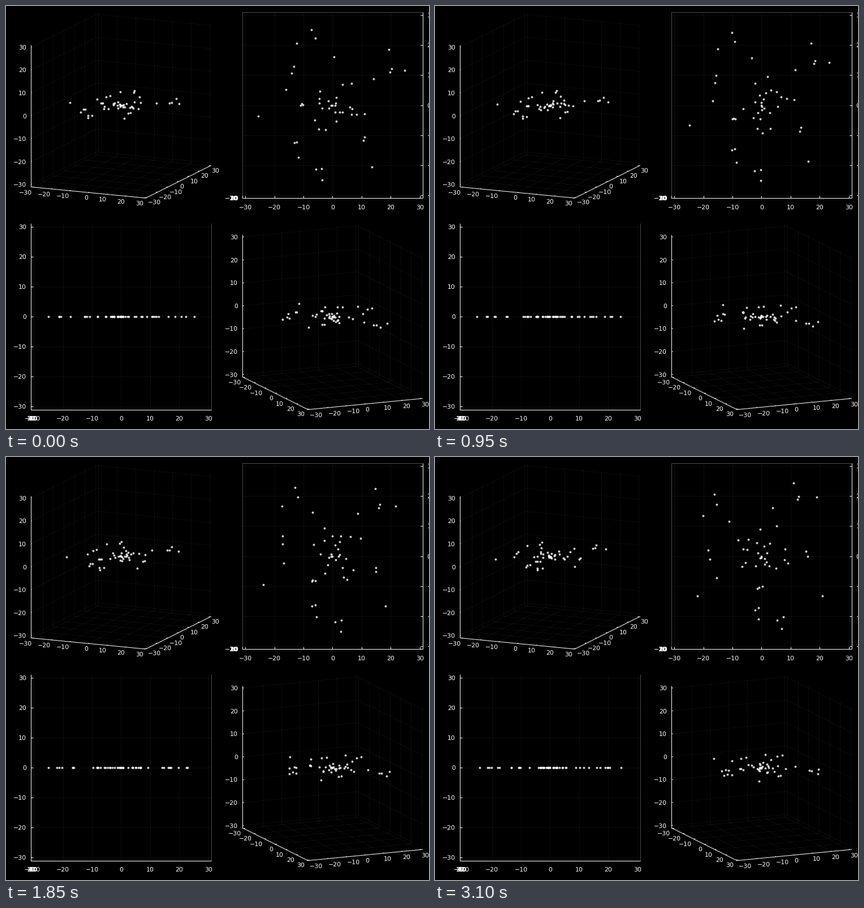
Write a matplotlib script that moves like this. It is 748x749 px and loops after 3150 ms.

```python
import numpy as np
import matplotlib.pyplot as plt
from matplotlib.animation import FuncAnimation
from matplotlib.collections import LineCollection

W, H, DPI = 748, 749, 100
FRAMES, INTERVAL = 63, 50
LIM = 31
TICKS = range(-30, 31, 10)
PX = 72 / DPI  # points per pixel

# Stars: a crowded core and two loose outer rings
rng = np.random.default_rng(4)
CORE = rng.uniform(0, 360, 28)
INNER_RING = [316, 312, 88, 32, 162, 225, 143, 224, 136]
OUTER_RING = [236, 260, 255, 29, 105, 31, 121, 303, 262, 188, 106, 44, 25]

RADIUS = np.concatenate([np.linspace(0, 11.4, 28), np.linspace(15.4, 18.5, 9),
                         np.linspace(21, 27.3, 13)])
ANGLE = np.radians(np.concatenate([CORE, INNER_RING, OUTER_RING]))
# Kepler speed; the mass inside the orbit grows slightly with the radius
SPEED = (0.84 + 0.0003 * RADIUS) / np.maximum(RADIUS, 0.1) ** 1.5

# Pixel steps of one unit along an axis
WIDE, NARROW, UP = np.array([(3.274, 0.318), (1.871, -0.935), (0, -4.058)])
FLAT_X, FLAT_UP, HIDDEN = (5.145, 0), (0, -5.31), (0, 0)
MIRROR = np.array([1, -1])

# Labels: alignment and offset from the tick
BELOW = ("center", 0, 15.5)
LEFT = ("right", -8, 0)

# Panels: centre, steps of x, y, z, labels of x, y, z
PANELS = [
    ((203.5, 175.5), (WIDE, NARROW, UP),
     (("right", -0.7, 9), ("left", 2.2, 8), LEFT)),
    ((577.5, 175.5), (FLAT_X, FLAT_UP, HIDDEN),
     (BELOW, ("left", 7.5, 0), LEFT)),
    ((203.5, 550), (HIDDEN, FLAT_X, FLAT_UP), (BELOW, BELOW, LEFT)),
    ((577.5, 550), (NARROW * MIRROR, WIDE * MIRROR, UP),
     (("right", -3.5, 8.5), ("left", 0, 9.5), LEFT)),
]

WALLS = (-LIM, LIM, -LIM)  # back wall position on x, y, z
AXES = [(0, -LIM, -LIM), (LIM, 0, -LIM), (-LIM, -LIM, 0)]
TICK_STEP = [(0, 0.8, 0), (-0.8, 0, 0), (0, 0.8, 0)]


def project(panel, points):
    return np.array(panel[0]) + np.asarray(points, float) @ np.array(panel[1])


def moved(point, axis, value):
    out = np.array(point, float)
    out[axis] = value
    return out


def span(point, axis):
    return [moved(point, axis, -LIM), moved(point, axis, LIM)]


def grid_lines():
    for wall in range(3):
        a, b = [i for i in range(3) if i != wall]
        base = moved((0, 0, 0), wall, WALLS[wall])
        for t in TICKS:
            yield span(moved(base, a, t), b)
            yield span(moved(base, b, t), a)


def draw_panel(ax, panel):
    grid = [project(panel, line) for line in grid_lines()]
    ax.add_collection(LineCollection(grid, colors="w", alpha=0.1,
                                     linewidths=0.5 * PX))
    frame = []
    for axis, base in enumerate(AXES):
        frame.append(project(panel, span(base, axis)))
        align, dx, dy = panel[2][axis]
        for t in TICKS:
            tick = moved(base, axis, t)
            frame.append(project(panel, [tick, tick + TICK_STEP[axis]]))
            x, y = project(panel, tick)
            ax.text(x + dx, y + dy, str(t).replace("-", "\u2212"), color="w",
                    ha=align, va="center_baseline", fontsize=11 * PX,
                    family="DejaVu Sans")
    ax.add_collection(LineCollection(frame, colors="w", linewidths=PX))
    return ax.plot([], [], "o", color="w", ms=3.9 * PX, mew=0, alpha=0.82,
                   zorder=3)[0]


fig = plt.figure(figsize=(W / DPI, H / DPI), dpi=DPI, facecolor="black")
ax = fig.add_axes([0, 0, 1, 1])
ax.axis("off")
ax.set_xlim(0, W)
ax.set_ylim(H, 0)
dots = [draw_panel(ax, panel) for panel in PANELS]


def update(i):
    phi = ANGLE + SPEED * i
    stars = np.column_stack([RADIUS * np.cos(phi), RADIUS * np.sin(phi),
                             np.zeros_like(phi)])
    for panel, dot in zip(PANELS, dots):
        dot.set_data(*project(panel, stars).T)
    return dots


anim = FuncAnimation(fig, update, frames=FRAMES, interval=INTERVAL,
                     repeat=True, repeat_delay=0)
plt.show()
```
